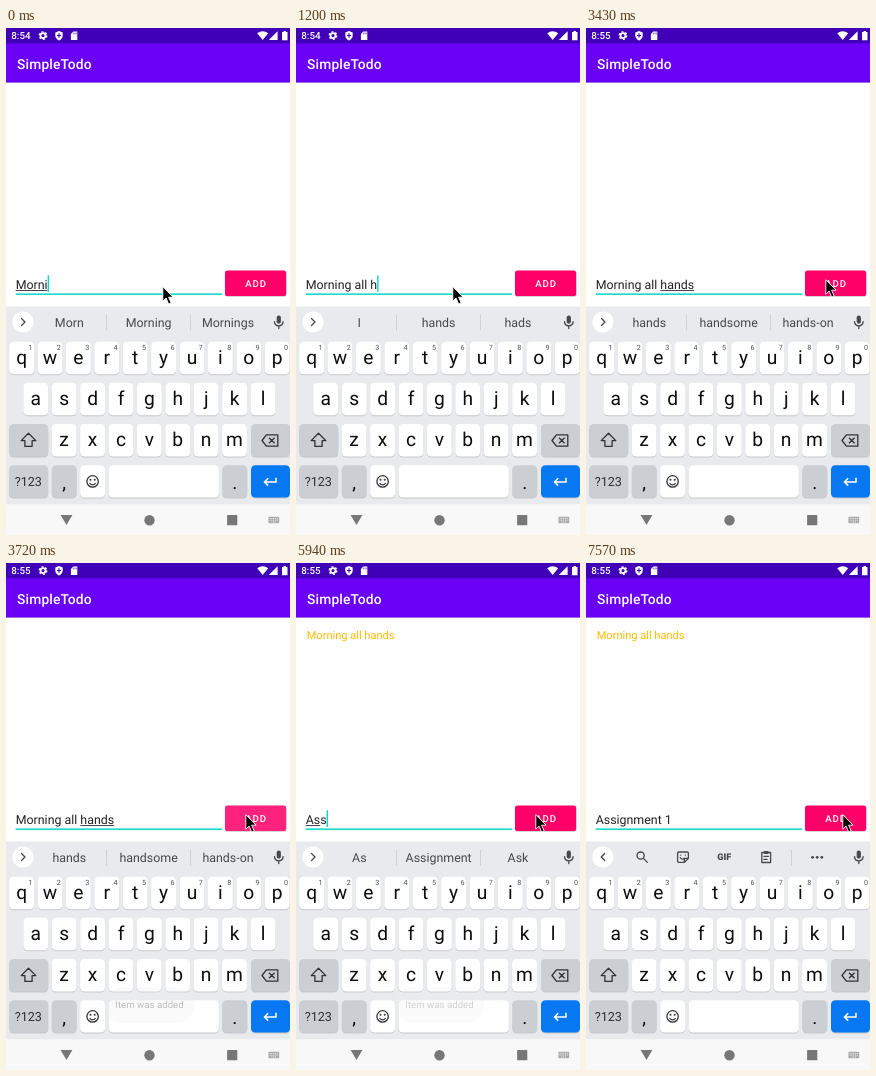
These frames come from a looping animation (284 px wide and 507 px high, 8000 ms). An HTML page:

```html
<!DOCTYPE html>
<html lang="en">
<head>
<meta charset="utf-8">
<title>To-do list</title>
<style>
html, body { margin: 0; width: 100%; height: 100%; overflow: hidden; background: #fff; }
svg { display: block; width: 100%; height: 100%; }
text { font-family: Roboto, sans-serif; white-space: pre; text-rendering: geometricPrecision; }
.mid { text-anchor: middle; }
.line { fill: none; stroke: #45484c; stroke-width: 1.3; stroke-linecap: round; stroke-linejoin: round; }
.key { font-size: 19.2px; fill: #0c0c0d; }
.num { font-size: 7.2px; fill: #505256; }
.field { font-size: 12.4px; }
.word { font-size: 12.4px; fill: #45484c; }
</style>
</head>
<body>
<svg id="stage" viewBox="0 0 284 507">
  <rect width="284" height="507" fill="#fff"/>
  <rect y="54" width="284" height="1" fill="#d9d3e4"/>
  <rect y="15" width="284" height="39.5" fill="#6a00f6"/>
  <rect width="284" height="15.3" fill="#3f00b8"/>

  <!-- status bar -->
  <g fill="#fff">
    <text id="clock" x="5.3" y="11.4" font-size="9.8" font-weight="500"></text>
    <circle cx="37" cy="7.6" r="2.5" fill="none" stroke="#fff" stroke-width="1.8"/>
    <circle cx="37" cy="7.6" r="3.8" fill="none" stroke="#fff" stroke-width="1.3" stroke-dasharray="1.99"/>
    <path d="M53 3l3.7 1.5v3c0 2.4-1.6 4.1-3.7 4.9-2.1-.8-3.7-2.5-3.7-4.9v-3z"/>
    <path d="M53 5.3v4.4M51 7.5h4" stroke="#3f00b8" stroke-width="1.1"/>
    <path d="M67.3 3.5h4v8.6h-6.4V6z"/>
    <path d="M67.4 4.6v1.7M69 4.6v1.7M70.3 4.6v1.7" stroke="#3f00b8" stroke-width=".6"/>
    <path d="M251.2 5.2q5.5-4 11 0l-5.5 6.9z"/>
    <path d="M271.6 3.2v8.9h-8.8z"/>
    <path d="M276 4h1.6v-1h2.3v1h1.6v8.2H276z"/>
  </g>
  <text x="11" y="40.6" font-size="13.8" font-weight="500" letter-spacing=".17" fill="#fff">SimpleTodo</text>

  <!-- list and entry field -->
  <text id="item" x="10.7" y="76" font-size="11.05" fill="#ffbb00">Morning all hands</text>
  <rect x="9.7" y="265.4" width="206.5" height="1.5" fill="#03dac5"/>
  <text id="hint" class="field" x="9.7" y="260.8" fill="#8d8d8d">Add an item here!</text>
  <text id="entry" class="field" x="9.7" y="260.8" fill="#212121"></text>
  <rect id="mark" y="262.1" height=".9" fill="#333"/>
  <rect id="caret" y="247.3" width="1.4" height="16.6" fill="#03dac5"/>
  <rect x="218.8" y="243.2" width="61.6" height="25.7" rx="2.6" fill="#000" opacity=".16"/>
  <rect x="219" y="242.4" width="61.2" height="25.6" rx="2.6" fill="#ff0068"/>
  <rect id="press" x="219" y="242.4" width="61.2" height="25.6" rx="2.6" fill="#fff"/>
  <text class="mid" x="250" y="258.8" font-size="9.65" font-weight="500" letter-spacing=".86" fill="#fff">ADD</text>

  <!-- keyboard -->
  <rect y="278.5" width="284" height="198" fill="#e8eaed"/>
  <circle cx="17" cy="294" r="10.6" fill="#fff"/>
  <path id="chevron" class="line"/>
  <g id="words">
    <path d="M100.5 286.5v16M184.5 286.5v16" stroke="#cfd1d5"/>
    <text class="word mid" x="63.3" y="299"></text>
    <text class="word mid" x="142.6" y="299"></text>
    <text class="word mid" x="222" y="299"></text>
  </g>
  <g id="tools">
    <path d="M205.5 286.5v16" stroke="#cfd1d5"/>
    <circle class="line" cx="54.6" cy="292.6" r="3.6"/>
    <path class="line" d="M57.4 295.4l4 4" stroke-width="1.6"/>
    <path class="line" d="M92.8 289h8.4q1.2 0 1.2 1.2v5.2l-3.9 3.9h-5.7q-1.2 0-1.2-1.2v-7.9q0-1.2 1.2-1.2zM102.2 295.3h-2.6q-1.2 0-1.2 1.2v2.6M94.3 294.6q2 2.8 4.3.6M94.7 292.1h.1M99.3 292.1h.1"/>
    <text class="mid" x="138.2" y="297.4" font-size="9.2" font-weight="900" fill="#45484c">GIF</text>
    <path class="line" d="M175.8 289.5h8.8v10h-8.8zM178 293.4h4.4M178 296.4h3"/>
    <rect x="177.8" y="288" width="4.8" height="3" rx=".8" fill="#45484c"/>
    <g fill="#45484c"><circle cx="226.6" cy="294.3" r="1.4"/><circle cx="231.2" cy="294.3" r="1.4"/><circle cx="235.8" cy="294.3" r="1.4"/></g>
  </g>
  <rect x="270.7" y="287.5" width="4.2" height="8.2" rx="2.1" fill="#45484c"/>
  <path class="line" d="M268.5 293.6q.3 4.2 4.3 4.2t4.3-4.2M272.8 298v2.6"/>
  <g id="keys"></g>
  <text class="mid" x="22.3" y="458" font-size="12.6" fill="#2c2e31">?123</text>
  <g stroke="#303236" fill="none" stroke-width="1.3" stroke-linejoin="round">
    <path d="M22.5 405.2l7.3 7.4h-3.7v5.8h-7.2v-5.8h-3.7z"/>
    <path d="M260.4 406.8h11.4v11.4h-11.4l-4.4-5.7zM263 409.7l5.6 5.6M268.6 409.7l-5.6 5.6"/>
    <circle cx="86.6" cy="453.4" r="5.7"/>
    <path d="M83.6 455.2q3 3.5 6 0"/>
  </g>
  <circle cx="84.5" cy="451.8" r="1" fill="#303236"/>
  <circle cx="88.7" cy="451.8" r="1" fill="#303236"/>
  <path d="M270 449.7v4.2h-11.4M262.2 450.2l-3.7 3.7 3.7 3.7" fill="none" stroke="#fff" stroke-width="1.5"/>

  <!-- navigation bar -->
  <rect y="476.5" width="284" height="30.5" fill="#f8f8f8"/>
  <g fill="#777">
    <path d="M54.6 487h11.8l-5.9 10z"/>
    <circle cx="143.5" cy="492.2" r="5.2"/>
    <rect x="221.1" y="487.1" width="10.2" height="10.2" rx=".6"/>
  </g>
  <rect x="262.4" y="488.7" width="10.8" height="6.6" rx=".8" fill="#aaa"/>
  <path d="M263.6 490.5h8.5M263.6 492.2h8.5M265.4 494h5" stroke="#f8f8f8" stroke-width=".8" stroke-dasharray="1 .8"/>

  <g id="toast">
    <rect x="98.5" y="425.5" width="90" height="34.5" rx="17" fill="#000" opacity=".05"/>
    <rect x="98.5" y="424.7" width="90" height="34.5" rx="17" fill="#eeeff0"/>
    <text class="mid" x="143.5" y="445.4" font-size="9.66" fill="#1c1c1c">Item was added</text>
  </g>
  <path id="mouse" d="M0 0v14.6l3.3-3.1 2.6 6 2.5-1.1-2.6-5.8h4.5z" fill="#000" stroke="#fff" stroke-width=".9"/>
</svg>
<script>
const LOOP = 8000, TICK = 148.4, LEFT = 9.7;
const $ = id => document.getElementById(id);
const pen = document.createElement('canvas').getContext('2d');
const clamp = x => Math.max(0, Math.min(1, x));
const ramp = (t, a, b) => clamp((t - a) / (b - a));
const ease = x => x * x * (3 - 2 * x);
const show = (id, on) => $(id).setAttribute('visibility', on ? 'visible' : 'hidden');

function width(s) {
  pen.font = '12.4px Roboto, sans-serif';
  return pen.measureText(s).width;
}

// Keyboard caps
const caps = [];
function cap(x, y, w, fill = '#fff') {
  const box = (dy, c) => `<rect x="${x}" y="${y + dy}" width="${w}" height="32.4" rx="4.3" fill="${c}"/>`;
  caps.push(box(1, '#c6c8cc') + box(0, fill));
}
function label(s, x, y, kind = 'key') {
  caps.push(`<text class="${kind} mid" x="${x}" y="${y}">${s}</text>`);
}
function row(letters, x0, y, digits = '') {
  [...letters].forEach((c, i) => {
    const x = x0 + i * 28.4;
    cap(x - 12.4, y, 24.8);
    label(c, x, y + 22.2);
    if (digits) label(digits[i], x + 8.8, y + 8.4, 'num');
  });
}
const GREY = '#cbced3';
row('qwertyuiop', 15.6, 313.8, '1234567890');
row('asdfghjkl', 29.8, 354.8);
row('zxcvbnm', 58.1, 396);
cap(3.2, 396, 39, GREY);
cap(245, 396, 39, GREY);
cap(3.2, 437.2, 39, GREY);
cap(45.8, 437.2, 24.8, GREY);
cap(74.2, 437.2, 24.8);
cap(102.6, 437.2, 110.2);
cap(216.4, 437.2, 24.8, GREY);
cap(245, 437.2, 39, '#0878f2');
label(',', 58.2, 461);
label('.', 228.8, 461);
$('keys').innerHTML = caps.join('');

// Typing: time, text, underline start and end, suggestions (none = toolbar)
const typing = [
  [0, 'Morni', 0, 5, 'Morn,Morning,Mornings'],
  [150, 'Mornin', 0, 6, 'Morn,Morning,Mornings'],
  [300, 'Morning', 0, 7, 'Morning,Mornings,Mourning'],
  [450, 'Morning ', 0, 0, 'to,and,all'],
  [600, 'Morning a', 8, 9, 'a,and,all'],
  [750, 'Morning all', 8, 11, 'all,and,also'],
  [900, 'Morning all ', 0, 0, 'I,the,of'],
  [1200, 'Morning all h', 0, 0, 'I,hands,hads'],
  [1350, 'Morning all ha', 12, 14, 'ha,have,had'],
  [1500, 'Morning all han', 12, 15, 'han,hands,hand'],
  [1650, 'Morning all hand', 12, 16, 'hand,hands,handy'],
  [1800, 'Morning all hands', 12, 17, 'hands,handsome,hands-on'],
  [3730, '', 0, 0, ''],
  [5200, 'A', 0, 0, ''],
  [5500, 'As', 0, 2, 'A,As,And'],
  [5800, 'As', 0, 2, 'As,Assignment,Ask'],
  [5940, 'Ass', 0, 2, 'As,Assignment,Ask'],
  [6090, 'Assi', 0, 4, 'Assign,Assignment,Assist'],
  [6240, 'Assig', 0, 5, 'Assign,Assignment,Assigned'],
  [6380, 'Assign', 0, 6, 'Assign,Assignment,Assigned'],
  [6530, 'Assignme', 0, 8, 'Assignment,Assignments,Assign'],
  [6680, 'Assignment', 0, 10, 'Assignment,Assignments,Assignment I'],
  [6830, 'Assignment ', 0, 10, 'Assignment,Assignments,Assignment I'],
  [6980, 'Assignment 1', 0, 0, 'Assignment,Assignments,Assignment I'],
  [7130, 'Assignment 1', 0, 0, '']
];
const caretOff = [[2390, 2840], [3430, 3730], [4010, 4610], [5050, 5200], [7570, LOOP]];

function render(t) {
  const [, text, from, to, list] = typing.filter(k => k[0] <= t).pop();
  const step = Math.floor(t / TICK) * TICK;

  $('clock').textContent = t < 3140 ? '8:54' : '8:55';
  show('item', t >= 3730);
  show('hint', !text);
  $('entry').textContent = text;
  $('mark').setAttribute('x', LEFT + width(text.slice(0, from)));
  $('mark').setAttribute('width', width(text.slice(from, to)));
  $('caret').setAttribute('x', LEFT + width(text) - (text ? 0 : .3));
  show('caret', !caretOff.some(([a, b]) => t >= a && t < b));

  show('words', list);
  show('tools', !list);
  $('chevron').setAttribute('d', list ? 'M15.5 290.5l3.5 3.5-3.5 3.5' : 'M18.7 290.5l-3.5 3.5 3.5 3.5');
  const words = list.split(',');
  document.querySelectorAll('.word').forEach((el, i) => {
    const s = words[i] || '';
    el.textContent = s;
    el.style.fontSize = s.length > 11 ? '11.1px' : '';
  });

  $('press').setAttribute('opacity', step < 3550 ? 0 : .22 * (1 - ramp(step, 3550, 3980)));
  $('toast').setAttribute('opacity', ramp(step, 3600, 3980) * (1 - ramp(step, 5600, 6020)));

  const x = 156.8 + 83 * ease(ramp(step, 1780, 2220)) + 17 * ease(ramp(step, 7000, 7560));
  const y = 258.6 - 7 * ease(ramp(step, 1780, 2220));
  $('mouse').setAttribute('transform', `translate(${x} ${y})`);
}

function frame() {
  render(performance.now() % LOOP);
  requestAnimationFrame(frame);
}
frame();
</script>
</body>
</html>
```
